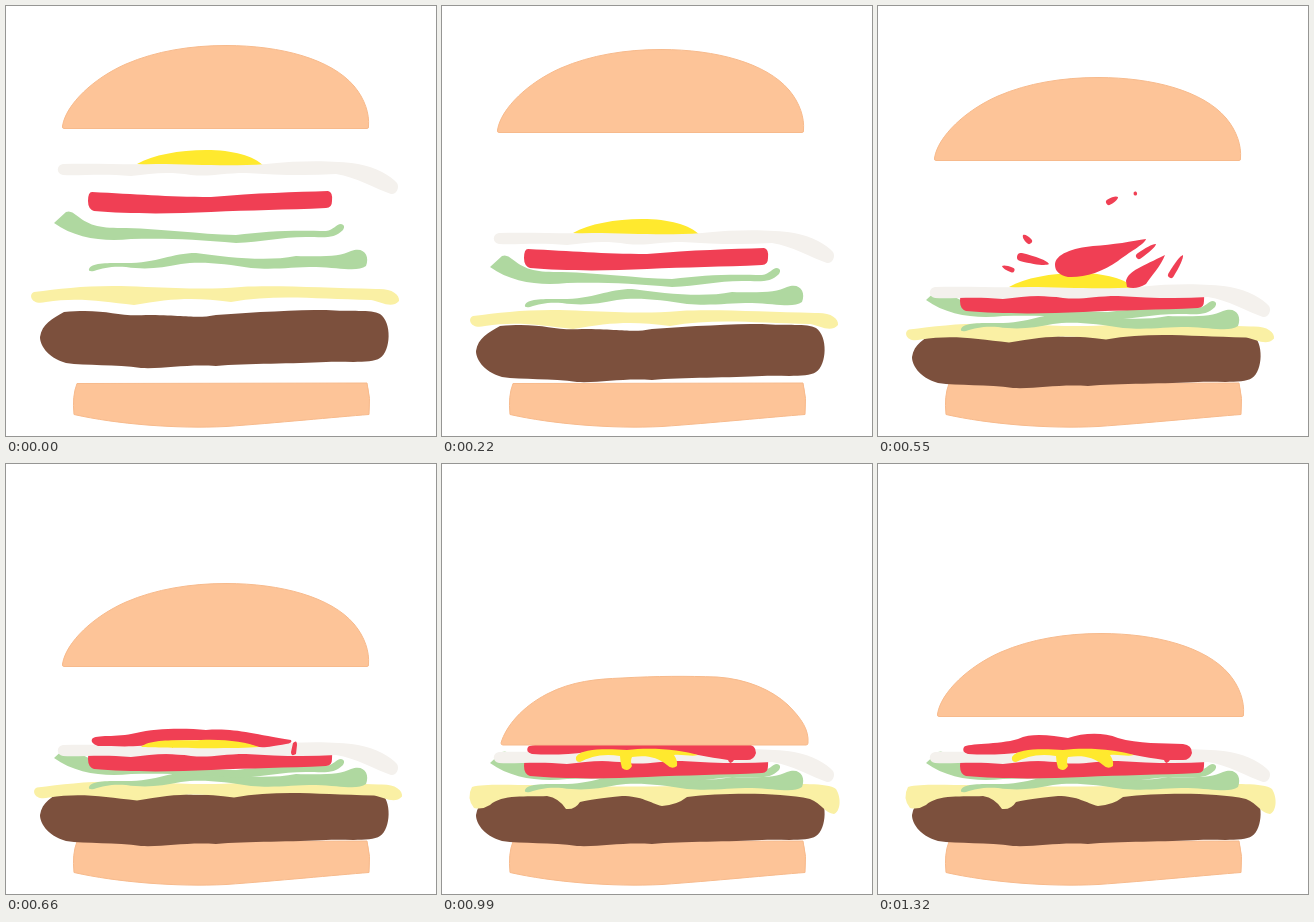
Recreate the animation shown at these times as an HTML page with a canvas. Size 430 by 430 pixels, loop 1.43 s.

```html
<!DOCTYPE html>
<html lang="en">
<head>
<meta charset="utf-8">
<title>Burger</title>
<style>
  html, body { margin: 0; height: 100%; overflow: hidden; background: #fff; }
  canvas { display: block; width: 100%; height: 100%; }
</style>
</head>
<body>
<canvas width="430" height="430"></canvas>
<script>
const ctx = document.querySelector('canvas').getContext('2d');
const STEP = 110, LOOP = 1430;
const color = {
  bun: '#fdc498', crust: '#f7ba8c', patty: '#7c503d', cheese: '#faf0a4', lettuce: '#afd8a0',
  red: '#f03f54', white: '#f4f1ed', yolk: '#ffe92e'
};

const shapes = {
  bun: 'M56.5 120C60 98 88 72 120 58C150 45 185 39.5 220 39.5C275 39.5 325 53 348 80C359 93 363.5 108 362.5 120Q363 122.5 361 122.5L58 122.5Q56 122.5 56.5 120Z',
  squashedBun: 'M59 279C64 262 80 243 105 230C130 217 155 215 180 214C215 212 245 212 275 213C305 215 330 226 346 241C360 255 367 266 366 279Q366 281 364 281L61 281Q59 281 59 279Z',
  base: 'M71 377.5L361 377Q365 392 363 408.5C330 411 270 417 220 420.5C170 423 110 418 68 408.5Q66 390 71 377.5Z',
  patty: 'M58 306C100 302 110 311 140 309C180 309 190 313 210 309C250 306 290 304 320 304C345 306 365 303 374 308C386 316 385 345 374 352C365 358 340 355 320 356C290 358 240 357 210 360C180 358 160 363 135 362C110 358 80 360 60 357C40 351 34 338 34 331C36 318 46 313 58 306Z',
  cheese: 'M28 286C60 282 90 278 140 281C175 282 200 284 235 281C270 279 320 282 370 283C385 282 394 288 393 295C386 303 375 296 365 294C310 293 270 288 225 296C190 291 165 292 128 299C95 295 70 291 40 296C25 300 22 288 28 286Z',
  meltedCheese: 'M30 323C45 319 80 322 110 321C180 324 260 322 330 319C355 321 385 318 394 325C400 335 398 348 392 350C383 349 380 340 368 335C335 328 280 329 245 333Q235 341 220 342C208 339 200 332 180 332Q150 335 138 338Q133 346 124 345Q117 334 105 332C85 333 60 330 48 341Q40 346 32 344Q24 334 30 323Z',
  lowerLeaf: 'M83 263C85 257 100 257 115 257C150 258 165 247 190 247C220 251 260 256 290 250C320 251 335 250 345 245C358 240 364 250 360 260C352 266 335 262 310 261C285 261 270 264 245 262C220 258 195 255 175 258C155 262 140 264 120 261C105 260 98 262 88 265Q82 266 83 263Z',
  upperLeaf: 'M48 217L60 206Q65 204 70 209C85 221 95 222 120 222C160 223 190 228 230 229C260 225 285 224 320 225C328 224 330 218 335 218Q340 219 337 224C328 233 320 231 300 231C275 231 255 236 230 237C190 233 155 232 125 233C100 236 70 233 48 217Z',
  tomato: 'M86 186C130 188 160 191 205 191C250 187 290 186 322 185Q327 186 326 195Q326 202 320 202C280 204 245 204 205 206C165 208 120 208 88 205Q82 203 82 195Q82 186 86 186Z',
  white: 'M57 158C90 157 120 159 150 158C190 158 220 161 260 158C300 154 330 155 352 158C370 161 385 170 391 177C394 182 390 189 385 188C370 183 350 171 330 168C300 170 270 169 240 167C215 167 205 171 185 169C160 165 145 168 125 170C95 167 75 170 57 169C50 168 50 159 57 158Z',
  yolk: 'M131 158C147 149 173 144 200 144C227 144 248 150 258 160C220 162 180 161 165 160C150 160 142 160 131 158Z',
  flatYolk: 'M135 283C145 274 175 277 195 276C220 275 240 278 253 283C230 285 150 284 135 283Z',
  runnyYolk: 'M134 293C140 284 165 285 185 286C210 283 240 286 256 291C250 293 240 290 232 291Q236 297 235 302Q230 306 225 301C215 293 205 291 190 293Q188 297 190 302Q186 309 180 304Q178 297 178 292C160 289 148 293 138 298Q133 298 134 293Z',
  splat: 'M86 275C90 270 110 274 130 269C150 264 180 264 200 266C230 264 245 270 285 276Q287 279 280 280C262 283 255 285 245 281C220 276 180 274 150 279C135 284 110 282 92 282Q84 279 86 275ZM287 279Q291 275 291 281L290 290Q285 293 285 288Z',
  sauce: 'M86 283C90 279 120 281 140 275C155 268 175 272 190 274C205 269 225 268 240 274C260 280 285 279 305 280Q314 281 314 289Q312 297 303 296L292 296Q288 302 286 296C265 293 250 289 230 288C200 289 180 285 145 288C125 291 105 291 90 290Q83 288 86 283Z',
  squirt: 'M396 138C393 148 380 157 371 169C361 179 350 181 345 177C340 170 345 160 357 154C368 149 383 147 390 141Q393 138 396 138Z',
  splash: 'M177 259C177 248 195 242 215 240C235 239 255 235 268 233C267 238 250 247 240 255C225 266 205 272 190 271Q177 268 177 259ZM248 275C250 265 265 260 287 249C283 260 273 270 268 278Q258 284 249 281Z'
};
for (const name in shapes) shapes[name] = new Path2D(shapes[name]);

function draw(name, fill, dx = 0, dy = 0, edge) {
  ctx.save();
  ctx.translate(dx, dy);
  ctx.fillStyle = fill;
  ctx.fill(shapes[name]);
  if (edge) {
    ctx.strokeStyle = edge;
    ctx.stroke(shapes[name]);
  }
  ctx.restore();
}

// Plump teardrop with a round head at (x, y) and a tail at (tipX, tipY).
function drop(x, y, tipX, tipY, r) {
  const len = Math.hypot(tipX - x, tipY - y);
  ctx.save();
  ctx.translate(x, y);
  ctx.rotate(Math.atan2(tipY - y, tipX - x));
  ctx.fillStyle = color.red;
  ctx.beginPath();
  ctx.moveTo(len, 0);
  ctx.bezierCurveTo(len * .9, -r * .7, len * .5, -r, 0, -r);
  ctx.arc(0, 0, r, -Math.PI / 2, Math.PI / 2, true);
  ctx.bezierCurveTo(len * .5, r, len * .9, r * .7, len, 0);
  ctx.fill();
  ctx.restore();
}

// Downward shift per step: patty, cheese, lower leaf, upper leaf, tomato, egg.
const falling = [
  [0, 0, 0, 0, 0, 0],
  [7, 10, 13, 12, 12, 15],
  [14, 24, 36, 44, 57, 69],
  [20, 37.5, 60, 77, 100, 123]
];
const pressed = [20, 0, 63, 82, 107, 130];

const bunShift = [
  [0, 0], [0, 0], [-1, 4], [-4, 10], [-2, 20], [0, 32], [0, 80],
  [1, 143], [3, 158], null, null, [3, 144], [3, 130]
];

function drawSauceDrops(step) {
  if (step === 3) draw('squirt', color.red);
  if (step === 4) {
    drop(283, 208, 345, 178, 12);
    drop(318, 224, 350, 202, 7);
  }
  if (step === 5) {
    draw('splash', color.red);
    drop(261, 250, 278, 238, 3);
    drop(293, 269, 305, 249, 3);
    drop(143, 251, 171, 258, 4);
    drop(134, 264, 124, 260, 2.5);
    drop(151, 235, 145, 229, 3);
    drop(231, 196, 240, 191, 3);
    drop(257.5, 187.5, 259, 187, 2);
  }
}

function render(step) {
  const melted = step >= 8, splatted = step === 6 || step === 7;
  const [patty, cheese, low, high, tomato, egg] = melted ? pressed : falling[Math.min(step, 3)];
  ctx.clearRect(0, 0, 430, 430);

  draw('base', color.bun, 0, 0, color.crust);
  draw('patty', color.patty, 0, patty);
  if (melted) draw('meltedCheese', color.cheese);
  else draw('cheese', color.cheese, step ? 3 : 0, cheese);
  draw('lowerLeaf', color.lettuce, 0, low);
  draw('upperLeaf', color.lettuce, 0, high);
  draw('tomato', color.red, 0, tomato);
  if (!melted && !splatted) draw('yolk', color.yolk, 0, egg);
  draw('white', color.white, 0, egg);
  if (splatted) {
    draw('splat', color.red);
    draw('flatYolk', color.yolk);
  }
  if (melted) {
    draw('sauce', color.red);
    draw('runnyYolk', color.yolk);
  }
  drawSauceDrops(step);

  const shift = bunShift[step];
  if (shift) draw('bun', color.bun, ...shift, color.crust);
  else draw('squashedBun', color.bun, 0, 0, color.crust);
}

function tick() {
  render(Math.floor(performance.now() % LOOP / STEP));
  requestAnimationFrame(tick);
}
tick();
</script>
</body>
</html>
```
